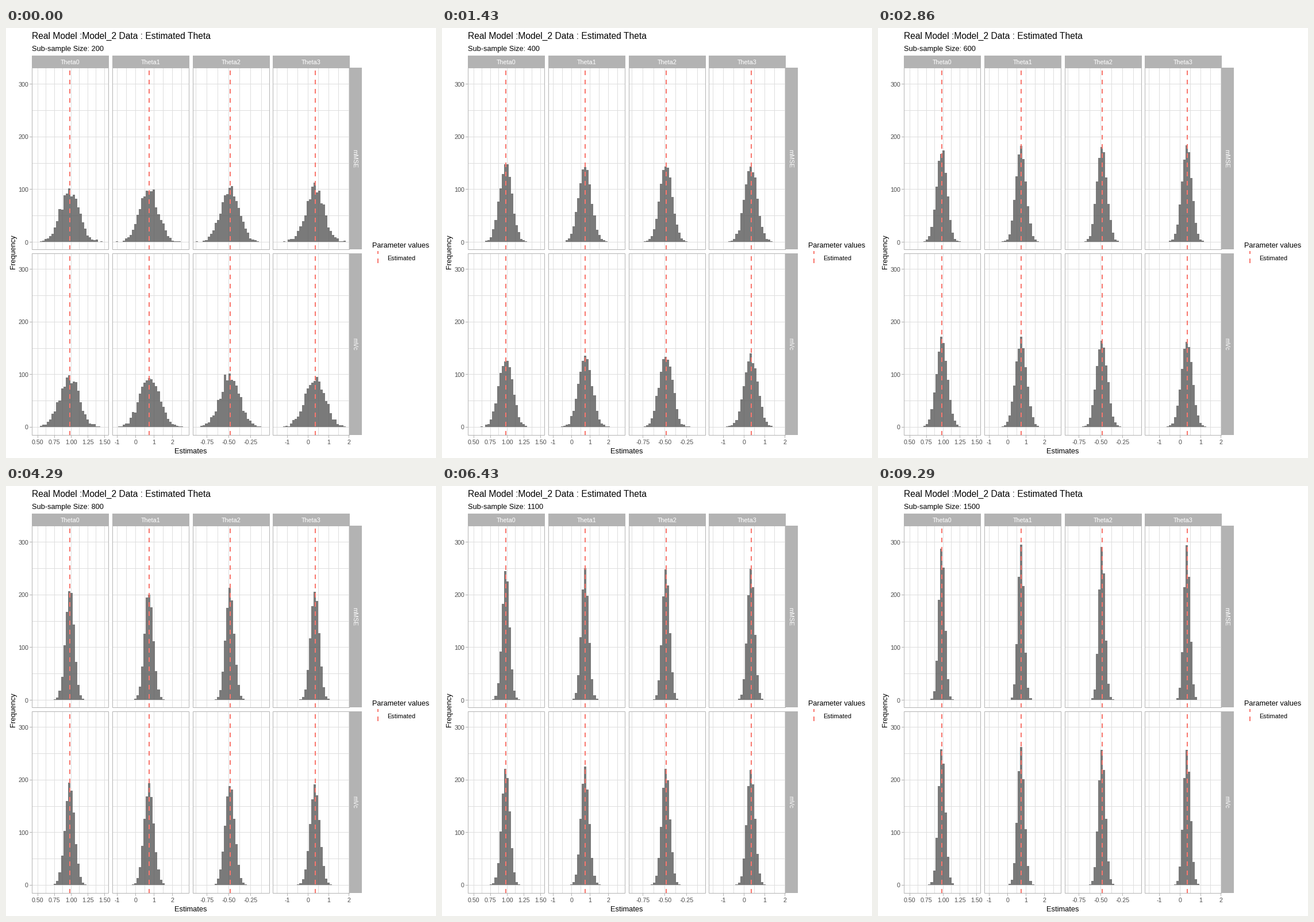
Write a matplotlib script that moves like this. It is 748x748 px and loops after 10 s.

```python
import math

import numpy as np
import matplotlib.pyplot as plt
from matplotlib.animation import FuncAnimation
from matplotlib.patches import Rectangle

plt.rcParams["font.family"] = "Liberation Sans"

STAGE, DPI = 748, 64
PT = 72 / DPI                      # points per pixel
LIGHT, GRID, BAR, RED = "#b3b3b3", "#dedede", "#595959", "#F8766D"
LABEL = "#4d4d4d"

SIZES = range(200, 1501, 100)
RUNS, BINS, BIN_W, PER_COUNT = 1000, 30, 4.05, 0.9165

# left, right, first bin edge, parameter line, centre of estimates in bins,
# first tick, tick step in pixels, first value, value step, format
COLS = [
    (45, 178, 51.0, 111, 14.77, 54.6, 29.1, 0.5, 0.25, ".2f"),
    (185, 318, 190.6, 249, 14.43, 193, 32, -1, 1, ".0f"),
    (325, 458, 330.3, 390, 14.62, 349, 37.8, -0.75, 0.25, ".2f"),
    (464, 597, 470.0, 538, 16.58, 489, 35.75, -1, 1, ".0f"),
]
# top, bottom, zero line, name, spread in bins at the least and most data
ROWS = [(69, 385, 372, "mMSE", 4.0, 1.33), (392, 708, 694, "mVc", 4.2, 1.52)]


def counts(size, row, col):
    """Bell-shaped histogram that narrows as a power of the sample size."""
    mid, (wide, narrow) = COLS[col][4], ROWS[row][4:]
    t = math.log(size / SIZES[0]) / math.log(SIZES[-1] / SIZES[0])
    sd = wide * (narrow / wide) ** t
    cdf = [0.5 * math.erf((k - mid) / sd / math.sqrt(2)) for k in range(BINS + 1)]
    bell = RUNS * np.diff(cdf)
    rng = np.random.default_rng(size + 10 * row + col)
    rough = 0.5 * (1 - t) + 0.1
    n = bell + rough * np.sqrt(bell) * rng.standard_normal(BINS)
    return np.maximum(np.round(n), 0)


fig = plt.figure(figsize=(STAGE / DPI, STAGE / DPI), dpi=DPI, facecolor="white")
ax = fig.add_axes([0, 0, 1, 1])
ax.set_xlim(0, STAGE)
ax.set_ylim(STAGE, 0)
ax.axis("off")


def text(x, y, s, px, color="black", **kw):
    kw.setdefault("va", "baseline")
    return ax.text(x, y, s, fontsize=px * PT, color=color, **kw)


def line(xs, ys, color, z, px=1, **kw):
    ax.plot(xs, ys, color=color, lw=px * PT, zorder=z, snap=False,
            solid_capstyle="butt", dash_capstyle="butt", **kw)


def pixel(v):
    """Centre of the pixel nearest to v."""
    return math.floor(v + 0.5) + 0.5


def hline(y, x0, x1, color):
    line([x0, x1], [pixel(y)] * 2, color, 1)


def vline(x, y0, y1, color):
    line([pixel(x)] * 2, [y0, y1], color, 1)


def dashes(x, bottom, top):
    line([x, x], [bottom, top], RED, 4, px=2, ls=(0, (4, 4)))


def box(x0, y0, x1, y1, z, **kw):
    ax.add_patch(Rectangle((x0, y0), x1 - x0, y1 - y0, zorder=z, snap=False, **kw))


def panel(row, col):
    top, bottom, zero = ROWS[row][:3]
    left, right, start, param, _, first, step = COLS[col][:7]
    lo = math.ceil((left + 2 - first) / (step / 2))
    hi = math.floor((right - first) / (step / 2))
    for k in range(lo, hi + 1):
        vline(first + k * step / 2, top, bottom, GRID)
    for n in range(0, 301, 50):
        hline(zero - n * PER_COUNT, left, right, GRID)
    dashes(param, bottom + 1, top)
    box(left + 0.5, top + 0.5, right + 0.5, bottom + 0.5, 5,
        fill=False, ec=LIGHT, lw=PT)
    edges = start + BIN_W * np.arange(BINS + 1)
    return ax.stairs(np.full(BINS, zero), edges, baseline=zero, fill=True,
                     color=BAR, alpha=0.8, lw=0, zorder=2)


bars = {(r, c): panel(r, c) for r in range(len(ROWS)) for c in range(len(COLS))}

for top, bottom, zero, name, *_ in ROWS:
    for n in range(0, 301, 100):
        y = zero - n * PER_COUNT
        hline(y, 41, 45, LIGHT)
        text(39, y + 4.5, str(n), 10.8, LABEL, ha="right")
    box(597, top, 619, bottom, 6, fc=LIGHT, lw=0)
    text(606, (top + bottom) / 2, name, 10.7, "white", rotation=270,
         ha="center", va="center", zorder=7)

for c, (left, right, _, _, _, first, step, v0, dv, fmt) in enumerate(COLS):
    box(left, 48, right + 1, 69, 6, fc=LIGHT, lw=0)
    text((left + right) / 2 + 0.5, 63, f"Theta{c}", 10.7, "white",
         ha="center", zorder=7)
    for k in range(math.floor((right - first) / step) + 1):
        vline(first + k * step, 709, 713, LIGHT)
        text(first + k * step + 0.5, 724, format(v0 + k * dv, fmt), 10.6, LABEL,
             ha="center")

text(45, 19, "Real Model :Model_2 Data : Estimated Theta", 15.6)
subtitle = text(45, 39.5, "", 12.8)
text(321, 740, "Estimates", 12.9, ha="center")
text(13, 389, "Frequency", 12.6, rotation=90, ha="center", va="center")
text(637, 382, "Parameter values", 12.65)
text(663, 403.5, "Estimated", 11)
dashes(647, 409, 388)


def draw(i):
    size = SIZES[i]
    subtitle.set_text(f"Sub-sample Size: {size}")
    for (r, c), bar in bars.items():
        bar.set_data(values=ROWS[r][2] - PER_COUNT * counts(size, r, c))
    return [subtitle, *bars.values()]


anim = FuncAnimation(fig, draw, frames=len(SIZES), interval=10000 / len(SIZES),
                     repeat=True, repeat_delay=0)
plt.show()
```
